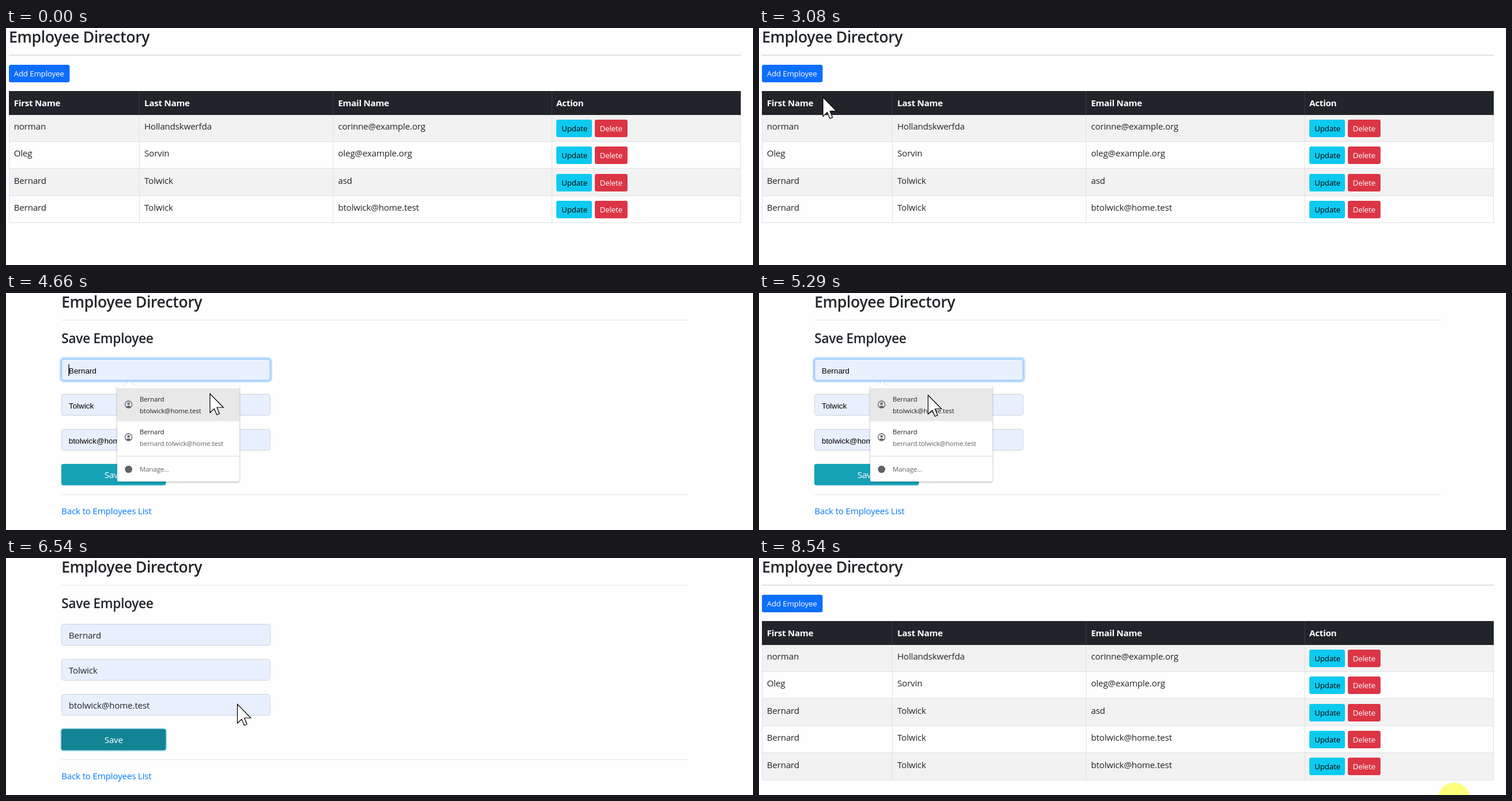
An HTML page that plays this animation: 1280x406 px, repeating every 8.63 s.

```html
<!DOCTYPE html>
<html lang="en">
<head>
<meta charset="utf-8">
<title>Employee Directory</title>
<style>
  html, body { margin: 0; width: 100%; height: 100%; overflow: hidden; background: #fefefe; }
  svg { display: block; width: 1280px; height: 406px; }
  text { font: 15px 'Open Sans', 'Noto Sans', sans-serif; letter-spacing: -.2px; fill: #212529; white-space: pre; }
  .h3 { font-size: 26.3px; font-weight: 600; letter-spacing: -.37px; }
  .h4 { font-size: 22.5px; font-weight: 600; letter-spacing: -.34px; }
  .th { font-weight: 700; letter-spacing: -.28px; fill: #fff; }
  .sm { font-size: 13.1px; letter-spacing: -.12px; }
  .tiny { font-size: 11.4px; letter-spacing: -.14px; }
  .hint { fill: #6c757d; }
  .white { fill: #fff; }
  .black { fill: #000; }
  .grey { fill: #5f6368; }
  .link { fill: #007bff; }
  .mid { text-anchor: middle; }
  .preview { font: 13.33px 'Liberation Sans', Arial, sans-serif; letter-spacing: 0; fill: #000; }
  #popup { filter: drop-shadow(0 1px 1.5px rgba(0, 0, 0, .35)); }
  #ibeam { mix-blend-mode: difference; fill: #fff; }
</style>
</head>
<body>
<svg id="stage" viewBox="0 0 1280 406"></svg>
<script>
const LOOP = 8630;
const OPEN_FORM = 3400, FOCUS = 4350, POPUP = 4420, COMMIT = 5710, CLOSE = 5825, SUBMIT = 6400, SAVED = 6600;
const FIRST = 'Bernard', LAST = 'Tolwick', MAIL = 'btolwick@home.test';
const PEOPLE = [
  ['norman', 'Hollandskwerfda', 'corinne@example.org'],
  ['Oleg', 'Sorvin', 'oleg@example.org'],
  [FIRST, LAST, 'asd'],
  [FIRST, LAST, MAIL],
  [FIRST, LAST, MAIL]
];
const CLICKS = [[3200, 3280], [4330, 4410], [5640, 5705], [6380, 6440], [8540, LOOP]];
// time, x, y, eased
const PATH = [
  [2140, 768, 398], [2180, 768, 398], [3000, 120, 140, 1], [3030, 118, 136], [3180, 92, 84],
  [3400, 92, 84], [3590, 118, 97], [3660, 118, 97], [3880, 398, 199, 1], [3900, 400, 200],
  [4060, 400, 200], [4180, 381, 148], [4420, 381, 148], [4660, 349, 172], [4700, 349, 172],
  [5190, 300, 175], [5600, 256, 173], [5900, 256, 173], [6300, 200, 312, 1], [6440, 200, 312],
  [6540, 396, 250], [6590, 396, 250], [6670, 606, 252], [6720, 606, 252], [7130, 867, 285, 1],
  [7490, 867, 285], [8260, 1191, 413, 1], [LOOP, 1191, 413]
];

const text = (x, y, str, cls = '') => `<text x="${x}" y="${y}" class="${cls}">${str}</text>`;
const rect = (x, y, w, h, fill, more = '') =>
  `<rect x="${x}" y="${y}" width="${w}" height="${h}" fill="${fill}" ${more}/>`;
const group = (id, body) => `<g id="${id}">${body}</g>`;

function row(person, i) {
  const top = 148.6 + 46.4 * i, y0 = Math.round(top), y1 = Math.round(top + 46.4);
  const base = Math.round(174 + 46.4 * i), btn = Math.round(156.7 + 46.4 * i);
  return group('row' + i,
    rect(5, y0, 1254, y1 - y0, i % 2 ? '#fefefe' : '#f2f2f2') +
    [5, 228, 560, 935, 1258].map(x => rect(x, y0, 1, y1 - y0, '#dee2e6')).join('') +
    rect(5, y1 - 1, 1254, 1, '#dee2e6') +
    person.map((s, c) => text([13.5, 237, 569][c], base, s)).join('') +
    rect(943, btn, 61, 30, '#0dcaf0', 'rx="3.2"') + text(952, btn + 20, 'Update', 'sm black') +
    rect(1009, btn, 56, 30, '#dc3545', 'rx="3.2"') + text(1017.5, btn + 20, 'Delete', 'sm white'));
}

const listPage = group('list',
  text(5, 25, 'Employee Directory', 'h3') +
  rect(5, 46, 1254, 1, '#c8c9ca') +
  rect(3.4, 61.4, 107.2, 33.2, 'none', 'id="addRing" rx="4.8" stroke="#3184fd" stroke-opacity=".5" stroke-width="3.2"') +
  rect(5, 63, 104, 30, '#0d6efd', 'id="add" rx="3.2"') +
  text(13.5, 83, 'Add Employee', 'sm white') +
  rect(5, 108, 1254, 41, '#212529') +
  [228, 560, 935].map(x => rect(x, 108, 1, 41, '#373b3e')).join('') +
  ['First Name', 'Last Name', 'Email Name', 'Action']
    .map((s, c) => text([13.5, 237, 569, 943][c], 134, s, 'th')).join('') +
  PEOPLE.map(row).join(''));

const field = i =>
  rect(95.2, 113.5 + 60 * i, 357.3, 36, '#fefefe', 'class="box" rx="4" stroke="#ced4da"') +
  text(107.5, 138 + 60 * i, '', 'value');

const formPage = group('form',
  text(95, 25, 'Employee Directory', 'h3') +
  rect(95, 46, 1074, 1, '#e5e5e5') +
  text(95, 86, 'Save Employee', 'h4') +
  [0, 1, 2].map(field).join('') +
  group('focus',
    rect(93.4, 111.4, 361.2, 40.2, 'none', 'rx="5.6" stroke="#007bff" stroke-opacity=".25" stroke-width="3.2"') +
    rect(95.2, 113.5, 357.3, 36, 'none', 'rx="4" stroke="#80bdff"')) +
  rect(107, 122, 1.3, 20, '#000', 'id="caret"') +
  rect(94, 292, 181, 38.6, 'none', 'id="saveRing" rx="5" stroke="#3ab0c3" stroke-opacity=".35" stroke-width="2"') +
  rect(94.7, 292.8, 179.3, 36.8, '#17a2b8', 'id="save" rx="4"') +
  text(184.5, 317, 'Save', 'white mid') +
  rect(95, 345, 1074, 1, '#e5e5e5') +
  text(95, 379, 'Back to Employees List', 'link'));

const person = y =>
  `<g transform="translate(210 ${y})"><circle r="6" fill="none" stroke="#5f6368" stroke-width="1.3"/>` +
  '<circle cy="-1.4" r="2.2" fill="#5f6368"/><path d="M-4.3 4.3Q0 -.4 4.3 4.3Q0 7 -4.3 4.3Z" fill="#5f6368"/></g>';

const popup = group('popup',
  '<path d="M203 159L211 151L219 159Z" fill="#fff"/>' +
  rect(190.5, 159, 209.5, 164, '#fff', 'rx="2"') +
  rect(190.5, 163, 209.5, 56.5, '#e8e8e9', 'id="hover"') +
  person(191) + text(229, 186, FIRST, 'tiny') + text(229, 206, MAIL, 'tiny') +
  person(247) + text(229, 242, FIRST, 'tiny') +
  text(229, 262, `${FIRST.toLowerCase()}.${LAST.toLowerCase()}@home.test`, 'tiny grey') +
  rect(190.5, 279, 209.5, 1, '#d8d9da') +
  '<circle cx="210" cy="302" r="6.3" fill="#5f6368"/>' + text(229, 306, 'Manage...', 'tiny grey'));

const pointer = group('pointer',
  '<circle id="press" r="28" fill="#ff0" fill-opacity=".5"/>' +
  '<path id="arrow" d="M.5 .5V33L7.8 26.2L12.3 36.7L16.8 34.8L12.4 24H23.5Z" fill="#fff" stroke="#000" stroke-width="1.2"/>' +
  '<path id="hand" d="M-2.5 2Q0 -2 2.5 2V12Q5.5 10 7.5 13Q10.5 11.5 12 14.5Q15.5 13 16.5 17V24Q16 28 13.5 32H-1L-9 20Q-10 16 -6 17L-2.5 21Z" fill="#fff" stroke="#000" stroke-width="1.3"/>');

const stage = document.getElementById('stage');
stage.innerHTML = rect(0, 0, 1280, 406, '#fefefe') + listPage + formPage + popup + pointer +
  '<path id="ibeam" d="M-9 -16H-1.5L0 -15L1.5 -16H9V-13.5H1.3V13H9V15.5H-9V13H-1.3V-13.5H-9Z"/>';

const $ = id => document.getElementById(id);
const boxes = [...stage.querySelectorAll('.box')];
const values = [...stage.querySelectorAll('.value')];
const show = (id, on) => { $(id).style.display = on ? '' : 'none'; };
const fade = (id, v) => { $(id).style.opacity = v; };
const ramp = (t, start, len = 150) => Math.min(1, Math.max(0, (t - start) / len));
const within = ([x, y], l, t, r, b) => x >= l && x <= r && y >= t && y <= b;

function place(t) {
  const i = PATH.findIndex(k => k[0] > t);
  const [t0, x0, y0] = PATH[Math.max(0, i - 1)], [t1, x1, y1, eased] = PATH[i];
  let p = ramp(t, t0, t1 - t0);
  if (eased) p = p * p * (3 - 2 * p);
  return [x0 + (x1 - x0) * p, y0 + (y1 - y0) * p];
}

function shape(t, pos, onForm, popupOn) {
  if (!onForm) return within(pos, 5, 63, 109, 93) ? 'hand' : 'arrow';
  if (t < 3660) return 'ibeam';
  if (t > 6445 || popupOn && within(pos, 190, 159, 400, 323)) return 'arrow';
  if (within(pos, 95, 293, 274, 330)) return 'hand';
  return [113, 173, 233].some(y => within(pos, 95, y, 453, y + 37)) ? 'ibeam' : 'arrow';
}

function fillForm(t, hovering) {
  const done = t >= COMMIT, filled = done || hovering;
  const words = filled ? [FIRST, LAST, MAIL] : ['First name', 'Last name', 'Email'];
  const cls = done ? 'value' : filled ? 'value preview' : 'value hint';
  values.forEach((el, i) => {
    if (el.textContent !== words[i]) el.textContent = words[i];
    el.setAttribute('class', cls);
    boxes[i].setAttribute('fill', filled ? '#e8f0fe' : '#fefefe');
  });
  const since = t - (done ? COMMIT : FOCUS);
  show('caret', t >= FOCUS && t < SUBMIT && since % 1000 < 500);
  $('caret').setAttribute('x', done ? 107.5 + values[0].getComputedTextLength() : 107);
}

function draw(t) {
  const onForm = t >= OPEN_FORM && t < SAVED;
  const popupOn = t >= POPUP && t < 5950;
  const pos = place(t), at = `translate(${pos[0]} ${pos[1]})`;
  show('list', !onForm);
  show('form', onForm);
  show('row4', t >= SAVED);
  show('popup', popupOn);

  const hovering = popupOn && pos[1] > 163;
  if (onForm) {
    fillForm(t, hovering);
    fade('focus', ramp(t, FOCUS) - ramp(t, SUBMIT));
    fade('saveRing', ramp(t, SUBMIT));
    const onSave = t > SUBMIT || within(pos, 95, 293, 274, 330);
    $('save').setAttribute('fill', onSave ? '#138496' : '#17a2b8');
  } else {
    const onAdd = within(pos, 5, 63, 109, 93);
    $('add').setAttribute('fill', onAdd ? '#0b5ed7' : '#0d6efd');
    fade('addRing', t < OPEN_FORM ? ramp(t, 3210) : 0);
  }

  show('hover', hovering);
  fade('popup', ramp(t, POPUP, 100) * (1 - ramp(t, CLOSE, 110)));
  $('popup').setAttribute('transform', t > CLOSE ? 'translate(1.3 1.3)' : '');

  const kind = shape(t, pos, onForm, popupOn);
  for (const k of ['arrow', 'hand', 'ibeam']) show(k, t >= 2140 && k === kind);
  show('press', CLICKS.some(([a, b]) => t >= a && t < b));
  $('pointer').setAttribute('transform', at);
  $('ibeam').setAttribute('transform', at);
}

function tick() {
  draw(performance.now() % LOOP);
  requestAnimationFrame(tick);
}
tick();
</script>
</body>
</html>
```
